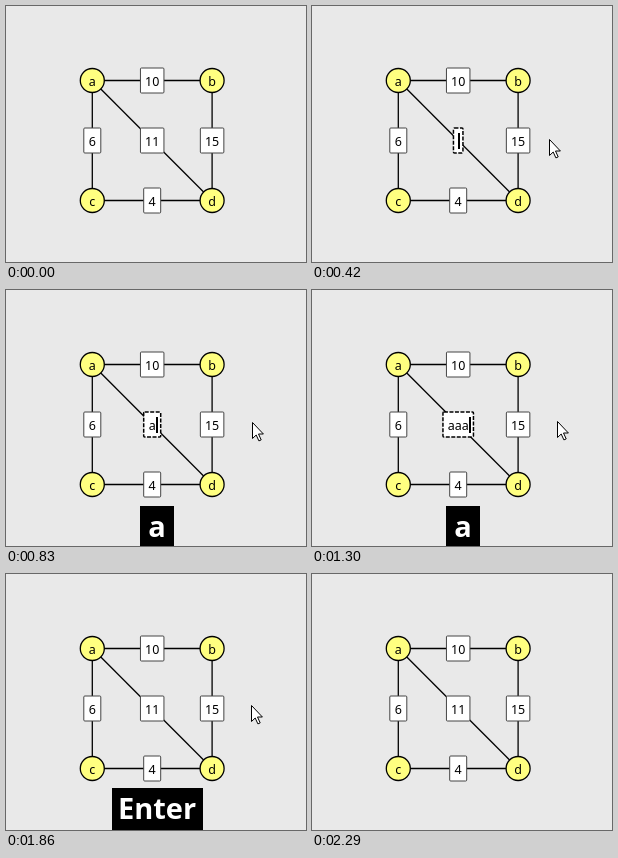
Animation, 300 px wide and 256 px high, one loop 2.38 s. Source, as an HTML page with a canvas:

```html
<!DOCTYPE html>
<html lang="en">
<head>
<meta charset="utf-8">
<title>Editing an edge weight</title>
<style>
html, body { margin: 0; width: 100%; height: 100%; overflow: hidden; background: #e9e9e9; }
canvas { display: block; }
</style>
</head>
<body>
<canvas id="stage" width="300" height="256"></canvas>
<script>
const ctx = document.getElementById("stage").getContext("2d");
const LOOP = 2380;
const LABEL_FONT = '12.5px "Noto Sans", sans-serif';
const KEY_FONT = 'bold 29px "Open Sans", sans-serif';

const nodes = { a: [86.3, 74.5], b: [206.1, 74.5], c: [86.3, 194.5], d: [206.1, 194.5] };
const edges = [["a", "b", "10"], ["a", "c", "6"], ["b", "d", "15"], ["c", "d", "4"]];
const arrow = new Path2D("M.5 .5V16.5L4.2 13 6.9 18.9 9.2 17.9 6.5 12H11.4Z");

// Each track lists [start time, value]; a value holds until the next start.
const pointer = [
  [0, null], [40, [166, 240]], [80, [164, 217]], [130, [160, 182]], [170, [157, 158]],
  [220, [153, 139]], [270, [152, 131]], [370, [195, 132]], [420, [237, 133]],
  [700, [251, 133]], [740, [249, 133]], [790, [247, 132]], [830, [246, 132]], [920, [245, 131]],
  [2000, [248, 150]], [2040, [257, 185]], [2090, [267, 232]], [2130, null]
];
const hovering = [[0, false], [220, true], [370, false]];
const entry = [[0, null], [370, ""], [830, "a"], [920, "aa"], [970, "aaa"], [1390, null]];
const caret = [[0, false], [420, true], [700, false], [830, true], [970, false], [1300, true]];
const pressed = [[0, []], [830, ["a"]], [1390, ["a", "Enter"]], [1860, ["Enter"]], [2290, []]];

const keyBoxes = { a: { width: 34, top: 216 }, Enter: { width: 91, top: 214 } };

const at = (track, time) => track.findLast(([start]) => start <= time)[1];

function line([x1, y1], [x2, y2], width) {
  ctx.lineWidth = width;
  ctx.beginPath();
  ctx.moveTo(x1, y1);
  ctx.lineTo(x2, y2);
  ctx.stroke();
}

function text(string, x, y, font, color) {
  ctx.font = font;
  ctx.fillStyle = color;
  ctx.fillText(string, x, y);
}

function drawLabel(string, x, y, editing, showCaret) {
  const textWidth = string.length * 7;
  const width = textWidth + (string.length === 1 ? 10 : 9.5);
  ctx.beginPath();
  ctx.roundRect(x - width / 2, y - 12.5, width, 25, 1);
  ctx.fillStyle = "#fff";
  ctx.fill();
  ctx.strokeStyle = editing ? "#000" : "#444";
  ctx.lineWidth = editing ? 1.5 : 1;
  ctx.setLineDash(editing ? [4, 1.5] : []);
  ctx.stroke();
  ctx.setLineDash([]);
  text(string, x, y + 5.5, LABEL_FONT, "#000");
  if (showCaret) ctx.fillRect(Math.round(x + textWidth / 2), y - 7.5, 2, 16);
}

function drawEdge([from, to, weight], width = 1.3, editing = false, showCaret = false) {
  const [x1, y1] = nodes[from], [x2, y2] = nodes[to];
  ctx.strokeStyle = "#000";
  line(nodes[from], nodes[to], width);
  drawLabel(weight, (x1 + x2) / 2, (y1 + y2) / 2, editing, showCaret);
}

function drawNode([name, [x, y]]) {
  ctx.beginPath();
  ctx.arc(x, y, 12, 0, 2 * Math.PI);
  ctx.fillStyle = "#ffff80";
  ctx.fill();
  ctx.strokeStyle = "#000";
  ctx.lineWidth = 1.3;
  ctx.stroke();
  text(name, x, y + 5.5, LABEL_FONT, "#000");
}

function drawKeys(keys) {
  let x = 151 - keys.reduce((sum, key) => sum + keyBoxes[key].width, 0) / 2;
  for (const key of keys) {
    const { width, top } = keyBoxes[key];
    ctx.fillStyle = "#000";
    ctx.fillRect(Math.round(x), top, width, 256 - top);
    text(key, x + width / 2, top + 30.5, KEY_FONT, "#fff");
    x += width;
  }
}

function drawPointer([x, y]) {
  ctx.save();
  ctx.translate(x, y);
  ctx.fillStyle = "#fff";
  ctx.fill(arrow);
  ctx.strokeStyle = "#000";
  ctx.lineWidth = 1;
  ctx.stroke(arrow);
  ctx.restore();
}

function draw(time) {
  const hover = at(hovering, time);
  const typed = at(entry, time);
  const editing = typed !== null;
  const position = at(pointer, time);

  ctx.textAlign = "center";
  ctx.fillStyle = "#e9e9e9";
  ctx.fillRect(0, 0, 300, 256);
  if (hover) {
    ctx.fillStyle = "#e0e0e0";
    ctx.fillRect(57, 46, 178, 177);
  }
  edges.forEach(edge => drawEdge(edge));
  drawEdge(["a", "d", typed ?? "11"], hover ? 13 : 1.3, editing, editing && at(caret, time));
  Object.entries(nodes).forEach(drawNode);
  drawKeys(at(pressed, time));
  if (position) drawPointer(position);
}

function frame() {
  draw(performance.now() % LOOP);
  requestAnimationFrame(frame);
}
frame();
</script>
</body>
</html>
```
